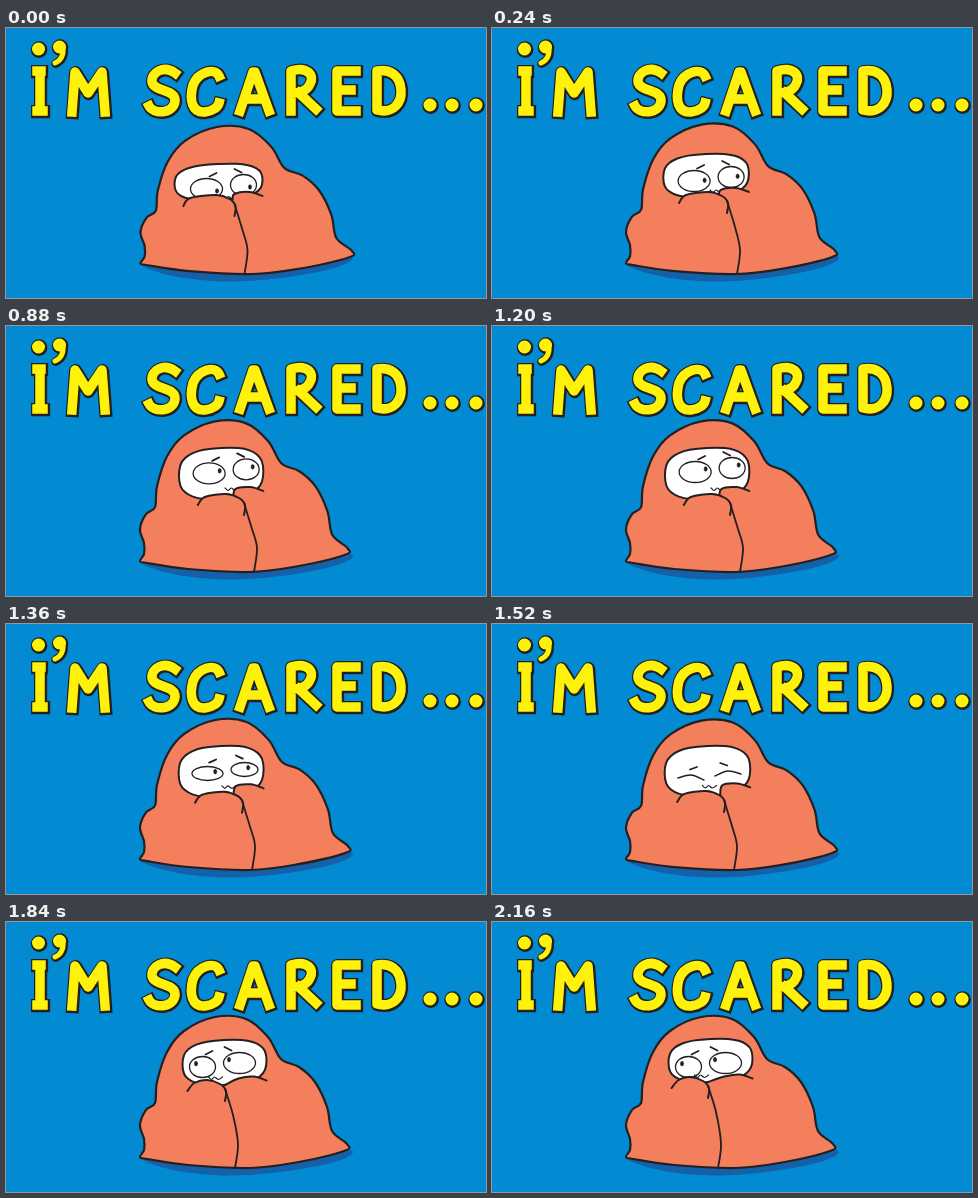
An HTML page with a canvas that plays this animation: 480x270 px, repeating every 2.6 s.

```html
<!DOCTYPE html>
<html lang="en">
<head>
<meta charset="utf-8">
<title>I'm scared...</title>
<style>
html, body { margin: 0; width: 100%; height: 100%; overflow: hidden; background: #028ad2; }
canvas { display: block; }
</style>
</head>
<body>
<canvas id="stage" width="480" height="270" aria-label="I'm scared..."></canvas>
<script>
const ctx = document.getElementById('stage').getContext('2d');
const INK = '#241f20', YELLOW = '#fff20a', CORAL = '#f47f5d', SHADE = '#1460a9', SKY = '#028ad2';
const STEP = 80, COUNT = 28, LOOP = 2600;

// Hand lettering as pen strokes
const letters = new Path2D(`
  M31 43H35M34 43V83M31 83H37
  M66 84L69 44L82 65L96 44L99 84
  M169 45C158 37 145 44 146 54C148 64 170 61 169 73C167 87 147 86 143 78
  M213 48C209 39 192 44 187 57C183 72 186 85 199 84C207 83 212 79 213 75
  M234 83L247 44H249L263 83M240 71H257
  M285 83V43C301 38 309 47 304 56C301 63 294 65 286 65M293 65L310 81
  M350 43H331V83H350M331 62H345
  M371 43V82C387 86 396 75 395 62C394 47 384 41 371 43Z`);
const dots = new Path2D('M32.5 21h.01M53.5 19h.01M424 77h.01M446 77h.01M470 77h.01');
const tail = new Path2D('M57 20Q58 31 49 35');

// Blanket outline at rest, clockwise from the lower left corner
const outline = [134,235, 138,228, 138,217, 134,203, 140,188, 149,181, 151,160, 161,130, 178,109,
  209,95, 240,97, 262,115, 275,137, 293,145, 309,160, 321,185, 326,209, 341,222, 338,229,
  287,241, 243,246, 182,243, 141,237];

// top: upper rim of the face; seamX, seamY: where the blanket is held shut;
// look: -1 left to 1 right; duck: how far the figure slumps
const key = (at, top, seamX, seamY, eyeY, look, duck) => ({ at, top, seamX, seamY, eyeY, look, duck });
const keys = [
  key(0, 136, 228, 176, 159, 1, 1),
  key(3, 126, 235, 173, 151, 1, .4),
  key(7, 122, 238, 177, 148, 1, .1),
  key(15, 122, 238, 177, 144, 1, .1),
  key(19, 122, 232, 176, 151, .1, .4),
  key(23, 118, 219, 167, 143, -1, 0),
  key(27, 117, 216, 164, 143, -1, 0),
];

// Key number i of the endless loop
const keyAt = i => {
  const turn = Math.floor(i / keys.length), k = keys[i - turn * keys.length];
  return { ...k, at: k.at + turn * COUNT };
};

// Smooth motion through the keys without overshoot
function poseAt(n) {
  const i = keys.findLastIndex(k => k.at <= n);
  const [a, b, c, d] = [-1, 0, 1, 2].map(j => keyAt(i + j));
  const span = c.at - b.at, u = (n - b.at) / span;
  const pose = {};
  for (const name in b) {
    const slope = (p, q) => (q[name] - p[name]) / (q.at - p.at);
    const blend = (s, t) => s * t > 0 ? 2 * s * t / (s + t) : 0;
    const s = slope(b, c), m0 = blend(slope(a, b), s), m1 = blend(s, slope(c, d));
    pose[name] = b[name] + span * u * (m0 * (1 - u) ** 2 + s * u * (3 - 2 * u) - m1 * u * (1 - u));
  }
  pose.lid = Math.min(1, Math.abs(n - 19) / 3);
  return pose;
}

// Smooth curve through a flat list of points
function curve(list, closed) {
  const count = list.length / 2, path = new Path2D();
  const point = i => {
    i = closed ? (i + count) % count : Math.min(count - 1, Math.max(0, i));
    return [list[2 * i], list[2 * i + 1]];
  };
  path.moveTo(...point(0));
  for (let i = 0; i < count - !closed; i++) {
    const [a, b, c, d] = [-1, 0, 1, 2].map(k => point(i + k));
    path.bezierCurveTo(b[0] + (c[0] - a[0]) / 6, b[1] + (c[1] - a[1]) / 6,
      c[0] - (d[0] - b[0]) / 6, c[1] - (d[1] - b[1]) / 6, ...c);
  }
  return path;
}

function draw(path, fill, width = 2, color = INK) {
  if (fill) { ctx.fillStyle = fill; ctx.fill(path); }
  ctx.strokeStyle = color;
  ctx.lineWidth = width;
  ctx.stroke(path);
}

function drawTitle() {
  for (const [color, grow, shift] of [[INK, 3.6, .6], [YELLOW, 0, 0]]) {
    ctx.save();
    ctx.translate(shift, shift);
    ctx.lineCap = 'square';
    draw(letters, null, 9.5 + grow, color);
    ctx.lineCap = 'round';
    draw(dots, null, 13 + grow, color);
    draw(tail, null, 5 + grow, color);
    ctx.restore();
  }
}

// Rounded box, its right end tipped up a little
function faceShape(x, y, rx, ry) {
  const soft = v => Math.sign(v) * Math.abs(v) ** .75;
  const points = [];
  for (let i = 0; i < 20; i++) {
    const a = i * Math.PI / 10, c = soft(Math.cos(a));
    points.push(x + rx * c, y + ry * soft(Math.sin(a)) - 2 * c);
  }
  return curve(points, true);
}

// side: -1 left, 1 right
function drawEye(p, side, faceX) {
  const x = faceX + 1.5 + side * 18.5 + 5 * p.look, y = p.eyeY - side * 2;
  const shut = 1 - p.lid;
  const brow = x - side * (10 - 4 * shut) - (side > 0 ? 2 - 3 * p.look : 0);
  draw(curve([brow, y - 16 + 6 * shut, brow + side * 7, y - 12.5 + 5 * shut]), null, 1.8);
  if (p.lid < .5) {
    return draw(curve([x - side * 13, y + 3, x, y - 2, x + side * 13, y + 1]), null, 1.4);
  }
  const eye = new Path2D(), pupil = new Path2D();
  eye.ellipse(x, y, 14.5 - side * 1.5 * p.look, 10.5 * p.lid, 0, 0, 7);
  draw(eye, '#fff', 1.3);
  pupil.ellipse(x - side * 2 + 8.5 * p.look, y + (p.eyeY - 153) / 3, 1.6, 2.3, 0, 0, 7);
  draw(pupil, INK, .5);
}

// A fold of cloth that hides what lies under it
function drawFold(points) {
  const edge = curve(points), cover = new Path2D(edge);
  const floor = points[1] + 18;
  cover.lineTo(points.at(-2), floor);
  cover.lineTo(points[0], floor);
  ctx.fillStyle = CORAL;
  ctx.fill(cover);
  draw(edge);
}

function drawFigure(p) {
  const slump = outline.map((v, i) => i % 2
    ? v + p.duck * (246 - v) / 38
    : v + p.duck * (v - 133) / 50);
  draw(curve(slump, true), CORAL, 2.2);

  const { seamX, seamY, look, duck } = p;
  const x = 217 - 1.5 * look - 3.5 * duck, rx = 42 + 2 * duck;
  const bottom = seamY - 4, y = (p.top + bottom) / 2;
  const face = faceShape(x, y, rx, bottom - y);
  draw(face, '#fff');
  ctx.save();
  ctx.clip(face);
  drawEye(p, -1, x);
  drawEye(p, 1, x);
  const mouthX = x + 10 * look;
  draw(curve([-6, -3, 0, 4, 8].flatMap((dx, i) => [mouthX + dx, y + 16 + (i % 2 ? 1 : -1.5)])), null, 1.2);
  ctx.restore();

  const endX = x + rx, endY = y + 18 - 4 * duck;
  drawFold([Math.min(seamX, endX - 30), seamY - 4, endX - 28, endY - 2, endX - 13, endY - 4, endX, endY]);
  const foldX = 50 + .6 * seamX - 10 * duck;
  drawFold([foldX, seamY + 2, foldX + 7, seamY - 6, seamX - 18, seamY - 9, seamX - 5, seamY - 5,
    seamX + 1, seamY + 2, seamX, seamY + 12]);
  draw(curve([seamX, seamY, seamX + 8, seamY + 26, seamX + 13, 222, seamX + 10, 246]), null, 1.8);
}

function frame(now) {
  const n = Math.min(COUNT - 1, Math.floor(now % LOOP / STEP));
  ctx.fillStyle = SKY;
  ctx.fillRect(0, 0, 480, 270);
  ctx.lineJoin = ctx.lineCap = 'round';
  drawTitle();
  ctx.fillStyle = SHADE;
  ctx.fill(new Path2D('M136 238C165 252 215 256 255 252C300 248 349 238 347 229L300 215H150Z'));
  ctx.save();
  ctx.translate(n % 2 ? 0 : .5, 0); // slight shiver
  drawFigure(poseAt(n));
  ctx.restore();
  requestAnimationFrame(frame);
}
requestAnimationFrame(frame);
</script>
</body>
</html>
```
